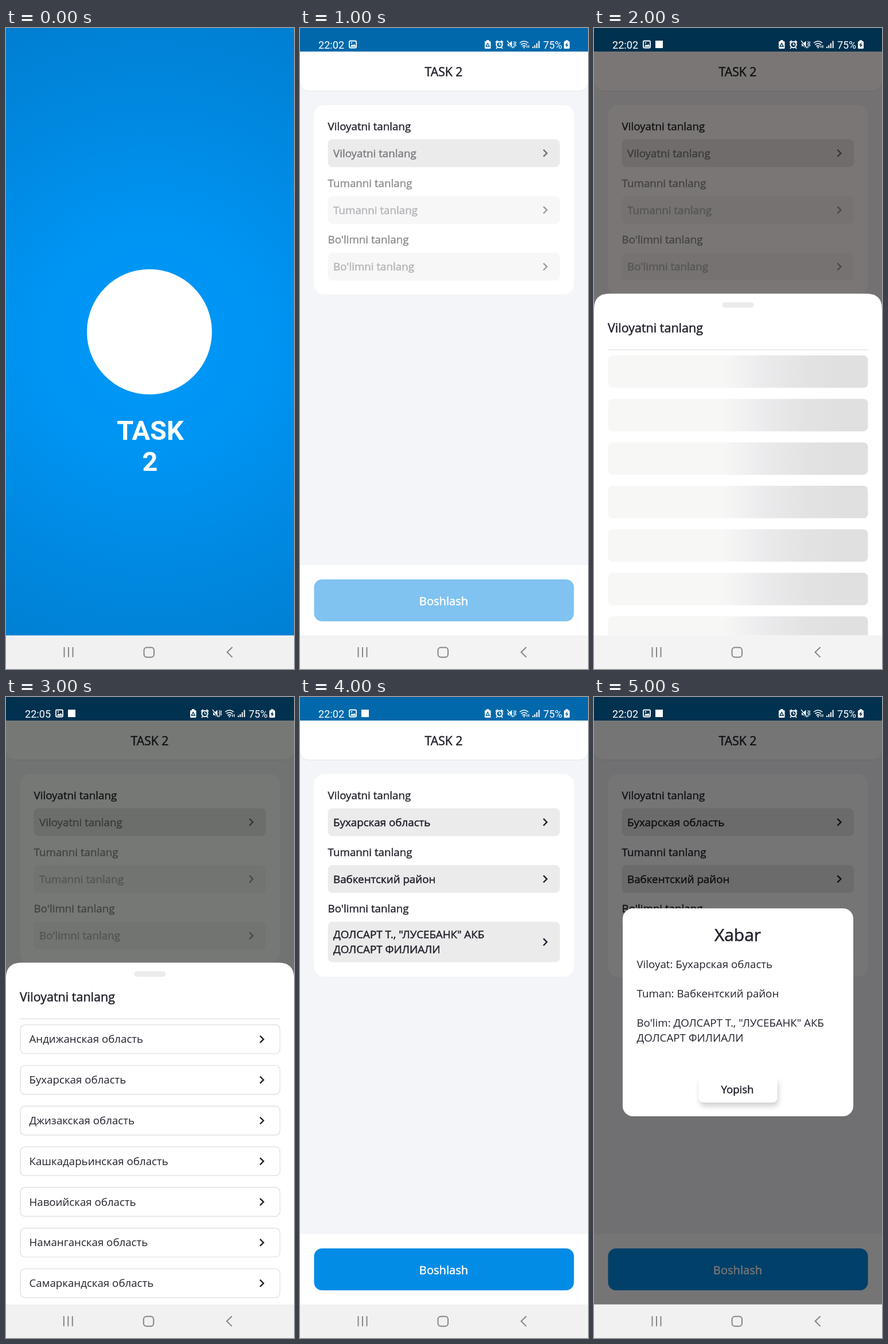
These frames come from a looping animation (502 px wide and 1116 px high, 6 s). An HTML page:

```html
<!DOCTYPE html>
<html lang="uz">
<head>
<meta charset="utf-8">
<title>Task 2</title>
<style>
html, body { margin: 0; width: 100%; height: 100%; overflow: hidden; background: #f4f5f9; }
svg { display: block; width: 100vw; height: 100vh; }
text { font-family: "Open Sans", "Noto Sans", sans-serif; white-space: pre; }
.sys { font-family: Roboto, sans-serif; }
</style>
</head>
<body>
<svg id="stage" viewBox="0 0 502 1116" preserveAspectRatio="none">
  <defs>
    <radialGradient id="sky" gradientUnits="userSpaceOnUse" cx="251" cy="545" r="590">
      <stop offset="0" stop-color="#0098f9"/>
      <stop offset=".35" stop-color="#0094f2"/>
      <stop offset=".6" stop-color="#008be5"/>
      <stop offset="1" stop-color="#007fd2"/>
    </radialGradient>
    <linearGradient id="bone">
      <stop offset=".44" stop-color="#f7f7f6"/>
      <stop offset=".6" stop-color="#ebebed"/>
      <stop offset=".76" stop-color="#e3e3e4"/>
      <stop offset=".9" stop-color="#e0e0e0"/>
    </linearGradient>
    <filter id="soft" x="-30%" y="-40%" width="160%" height="200%">
      <feGaussianBlur stdDeviation="4"/>
    </filter>
    <clipPath id="app"><rect width="502" height="1057.5"/></clipPath>
  </defs>
  <g id="scene"></g>
</svg>
<script>
const LOOP = 6000, STEP = 1000;
const INK = '#22222d';
const PROMPTS = ['Viloyatni tanlang', 'Tumanni tanlang', "Bo'limni tanlang"];
const REGIONS = ['Андижанская', 'Бухарская', 'Джизакская', 'Кашкадарьинская',
  'Навоийская', 'Наманганская', 'Самаркандская'].map(name => name + ' область');
const BRANCH = ['ДОЛСАРТ Т., "ЛУСЕБАНК" АКБ', 'ДОЛСАРТ ФИЛИАЛИ'];
const CHOICES = [[REGIONS[1]], ['Вабкентский район'], BRANCH];

const rect = (x, y, w, h, r, fill, extra = '') =>
  `<rect x="${x}" y="${y}" width="${w}" height="${h}" rx="${r}" fill="${fill}" ${extra}/>`;

const line = (d, color, width, extra = '') =>
  `<path d="${d}" fill="none" stroke="${color}" stroke-width="${width}" ${extra}/>`;

const shape = (d, fill) => `<path d="${d}" fill="${fill}"/>`;

// weight is an outline that thickens the regular face without widening it
function text(str, x, y, size, { fill = INK, weight = 0, mid = false, cls = '', bold = false } = {}) {
  return `<text x="${x}" y="${y}" font-size="${size}" fill="${fill}" class="${cls}"` +
    (weight ? ` stroke="${fill}" stroke-width="${weight}"` : '') +
    (mid ? ' text-anchor="middle"' : '') +
    (bold ? ' font-weight="700"' : '') + `>${str}</text>`;
}

const chevron = (x, y, color) =>
  line(`M${x - 3.5} ${y - 6}l6 6l-6 6`, color, 2.4);

function navBar(dx = 0, fill = '#f3f3f3') {
  const gray = '#858585';
  return rect(0, 1057.5, 502, 58.5, 0, fill) + `<g transform="translate(${dx})">` +
    line('M101.5 1078v17.5M109 1078v17.5M116.5 1078v17.5', gray, 2) +
    rect(240.5, 1078.5, 17.5, 17, 5, 'none', `stroke="${gray}" stroke-width="2"`) +
    line('M394.5 1078l-9 8.8l9 8.8', gray, 2) + '</g>';
}

function statusIcons(bar) {
  const w = '#fff';
  return rect(322, 23, 10.5, 13, 1.5, w) + rect(325, 21, 4.5, 3, .5, w) +
    line('M327.2 26.5l3 5.5h-6z', bar, 1.4) +
    `<circle cx="347.5" cy="29" r="5.2" fill="none" stroke="#fff" stroke-width="2"/>` +
    line('M341 25l3.6-3M354 25l-3.6-3M343.5 34l-1.5 2M351.5 34l1.5 2', w, 1.8) +
    line('M347.5 25.8v3.6h2.8', w, 1.4) +
    shape('M362 26.5h3l4.5-4v13l-4.5-4h-3z', w) +
    line('M361 23l9.5 12', bar, 2.4) + line('M361 22l10.5 13', w, 1.3) +
    line('M372.5 23l1.5 2l-1.5 2.5l1.5 2.5l-1.5 2.5l1 2M375.5 23.5l1 1.8l-1.2 2.2l1.2 2.5l-1.2 2.2', w, 1.2) +
    line('M383 26q7.5-6 15 0M385.3 29q5.2-4 10.4 0M387.5 32q3-2.3 6 0', w, 1.6) +
    shape('M388.6 33.2h4l-2 2.5z', w) +
    line('M395.7 34.5v-4M398.7 30v4.5', w, 1.4) +
    line('M406 35v-2.5M409.3 35v-5M412.8 35v-8.5M416.6 35V22.5', w, 2) +
    rect(460, 23, 10, 13, 1.5, w) + rect(462.7, 21.3, 4.6, 3, .5, w) +
    shape('M466.3 24.8l-4.3 5.4h2.6l-1 4.4l4.4-5.6h-2.6z', bar);
}

function statusBar(bar, { clock = '22:02', dx = 0, badge = true } = {}) {
  const sys = { fill: '#fff', cls: 'sys' };
  return rect(0, 0, 502, 41, 0, bar) +
    `<g transform="translate(${dx})">` + text(clock, 32, 35.5, 18.1, sys) +
    rect(86, 22.5, 12, 12, 1.5, 'none', 'stroke="#fff" stroke-width="1.8"') +
    shape('M87.5 32.5l3-4l2 2l2-2.8l3 4.8z', '#fff') +
    `<circle cx="90" cy="26" r="1.2" fill="#fff"/>` +
    (badge ? rect(107, 22, 13, 13, 0, '#fff') : '') + '</g>' +
    `<g transform="translate(${-dx})">` + statusIcons(bar) +
    text('75%', 424, 35.5, 17.9, sys) + '</g>';
}

function field(i, y, filled) {
  const active = filled || i === 0;
  const lines = filled ? CHOICES[i] : [PROMPTS[i]];
  const h = lines.length > 1 ? 70.5 : 48.5;
  const label = active ? INK : '#8b8b90';
  const value = filled ? INK : active ? '#7d7d82' : '#b5b5b9';
  const arrow = filled ? INK : active ? '#707075' : '#9c9ca0';
  return text(PROMPTS[i], 48.5, y - 16, 18.75, { fill: label, weight: .4 }) +
    rect(48.5, y, 404.5, h, 8, active ? '#ebebeb' : '#f7f7f7') +
    lines.map((s, n) => text(s, 58, y + (h > 50 ? 28.7 : 31) + n * 25.7, 18.75,
      { fill: value, weight: .5 })).join('') +
    chevron(427.8, y + h / 2, arrow);
}

function form(filled) {
  return rect(0, 41, 502, 1017, 0, '#f4f5f9') +
    shape('M0 41H502V93Q502 110.5 484 110.5H18Q0 110.5 0 93z', '#ebecf0') +
    shape('M0 41H502V91Q502 109 484 109H18Q0 109 0 91z', '#fff') +
    text('TASK 2', 250.5, 83.7, 21.2, { weight: .5, mid: true }) +
    rect(24.5, 134, 453, filled ? 353 : 330, 18, '#fff') +
    [193.7, 292.6, 391.3].map((y, i) => field(i, y, filled)).join('') +
    rect(0, 935, 502, 123, 0, '#fff') +
    rect(24.5, 960, 453, 73, 14, filled ? '#038ce6' : '#80c3f1') +
    text('Boshlash', 250.5, 1004.5, 20.1, { fill: '#fff', weight: .5, mid: true });
}

const dim = color => rect(0, 41, 502, 1017, 0, color, 'fill-opacity=".54"');

function sheet(body) {
  return shape('M0 1058V489Q0 462.5 27 462.5H475Q502 462.5 502 489V1058z', '#fff') +
    rect(223.5, 477.5, 55, 9.5, 4.75, '#ebebeb') +
    text(PROMPTS[0], 24, 529.7, 21.5, { weight: .5 }) +
    rect(24, 559.7, 454, 1, 0, '#d8d8d8') +
    `<g clip-path="url(#app)">${body}</g>`;
}

const bones = () => REGIONS.map((_, i) =>
  rect(24.5, 570 + i * 75.7, 453, 56.5, 8, 'url(#bone)')).join('');

const regionList = () => REGIONS.map((name, i) => {
  const y = 570.7 + i * 70.8;
  return rect(25, y, 452.5, 50.3, 8, '#fff', 'stroke="#dcdcdf" stroke-width="1.2"') +
    text(name, 40.5, y + 31.7, 18.7) + chevron(446.3, y + 25.2, INK);
}).join('');

function dialog() {
  const rows = ['Viloyat: ' + REGIONS[1], 'Tuman: ' + CHOICES[1],
    "Bo'lim: " + BRANCH[0], BRANCH[1]];
  const tops = [471.5, 523, 574.3, 599.7];
  return rect(50, 368, 402, 362, 18, '#fff') +
    text('Xabar', 250.5, 424.5, 29.9, { weight: .6, mid: true }) +
    rows.map((s, i) => text(s, 74.5, tops[i], 18.7)).join('') +
    rect(184, 668, 138, 45, 9, '#000', 'fill-opacity=".17" filter="url(#soft)"') +
    rect(182.5, 660, 137, 46, 8, '#fff') +
    text('Yopish', 250, 690.2, 18.6, { weight: .5, mid: true });
}

function splash() {
  const white = { fill: '#fff', cls: 'sys', bold: true, mid: true };
  return rect(0, 0, 502, 1058, 0, 'url(#sky)') +
    '<circle cx="250" cy="529" r="109" fill="#fff"/>' +
    text('TASK', 251.5, 716.5, 47, white) + text('2', 251, 771, 47, white);
}

const LIGHT = '#0169ab', DARK = '#00314f';
const scenes = [
  () => splash() + navBar(0, '#f1f1f1'),
  () => statusBar(LIGHT, { badge: false }) + form(false) + navBar(),
  () => statusBar(DARK) + form(false) + dim('#080200') + sheet(bones()) + navBar(),
  () => statusBar(DARK, { clock: '22:05', dx: 1 }) + form(false) + dim('#020700') +
    sheet(regionList()) + navBar(-.7, '#f1f1f1'),
  () => statusBar(LIGHT) + form(true) + navBar(0, '#f1f1f1'),
  () => statusBar(DARK) + form(true) + dim('#000') + dialog() + navBar(0, '#f1f1f1')
];

const scene = document.getElementById('scene');
let shown = -1;

function draw(ms) {
  const i = Math.floor((ms % LOOP) / STEP);
  if (i === shown) return;
  shown = i;
  scene.innerHTML = scenes[i]();
}

const start = performance.now();
function tick() {
  draw(performance.now() - start);
  requestAnimationFrame(tick);
}
tick();
</script>
</body>
</html>
```
